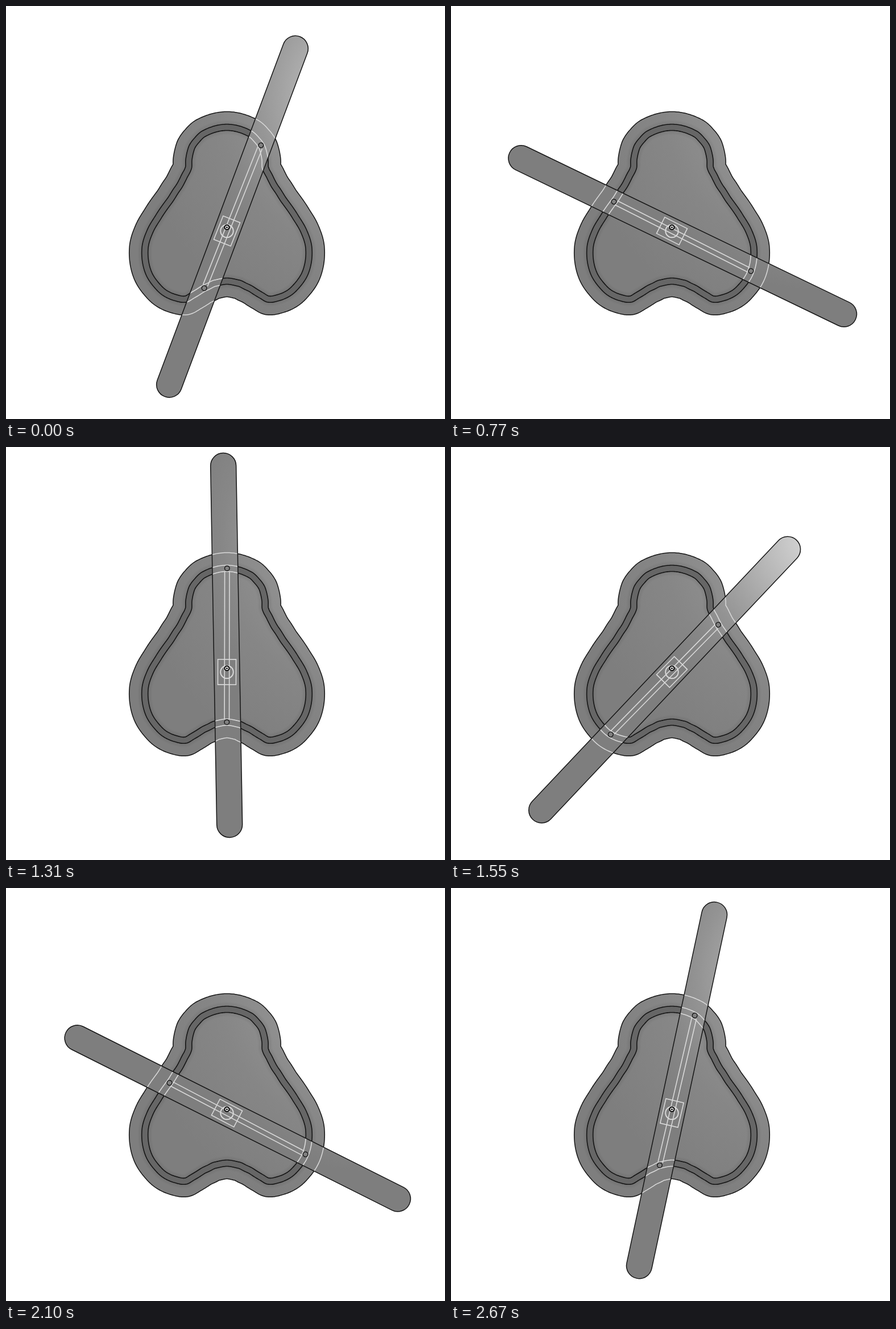
An HTML page with a canvas that plays this animation: 772 by 725 pixels, repeating every 2.74 s.

```html
<!DOCTYPE html>
<html lang="en">
<head>
<meta charset="utf-8">
<title>Constant-chord cam</title>
<style>
html, body { margin: 0; width: 772px; height: 725px; overflow: hidden; background: #fff; }
canvas { display: block; }
</style>
</head>
<body>
<canvas id="stage" width="772" height="725"></canvas>
<script>
const ctx = document.getElementById('stage').getContext('2d');
const LOOP = 2740, CX = 388.5, CY = 395, CHORD = 270;
const ARM = 180, HALF = 22.5, SKEW = 1.1;
const RAD = Math.PI / 180;
const INK = '#141414', HIDDEN = '#d9d9d9';

// Groove radius by angle from straight up; the rest follows from symmetry.
const knots = [
  [0, 182], [13.3, 175.7], [19, 167], [21.7, 162], [23.3, 158], [28.2, 141.8],
  [31.2, 130.3], [37.5, 122.3], [44.5, 116.3], [50.3, 114.3], [62.3, 114],
  [78.3, 123], [90, 135]
];

// [step, start in ms, bar angle in degrees]
const keys = [
  [0, 0, 20.6], [1, 70, 30], [6, 460, 76.9], [7, 540, 85.5], [8, 610, 94.4],
  [13, 1000, 147.7], [14, 1080, 156.8], [20, 1550, 223.4], [21, 1640, 234.3],
  [27, 2100, 296.6], [28, 2180, 307.3], [31, 2420, 339.8], [34, 2670, 372.1],
  [35, 2740, 380.6]
];

function knotSlope(i) {
  if (i === 0) return 0;
  const a = knots[i - 1], b = knots[Math.min(i + 1, knots.length - 1)];
  return (b[1] - a[1]) / (b[0] - a[0]);
}

function radius(deg) {
  let a = Math.abs(deg) % 360;
  if (a > 180) a = 360 - a;
  if (a > 90) return CHORD - radius(180 - a);
  let i = 0;
  while (i < knots.length - 2 && a > knots[i + 1][0]) i++;
  const [x0, y0] = knots[i], [x1, y1] = knots[i + 1];
  const h = x1 - x0, t = (a - x0) / h, u = 1 - t;
  return y0 * (1 + 2 * t) * u * u + knotSlope(i) * h * t * u * u
       + y1 * t * t * (3 - 2 * t) - knotSlope(i + 1) * h * t * t * u;
}

function buildGroove() {
  const path = new Path2D();
  for (let a = 0; a < 360; a += 0.5) {
    const r = radius(a);
    path.lineTo(CX + r * Math.sin(a * RAD), CY - r * Math.cos(a * RAD));
  }
  path.closePath();
  return path;
}

function buildSteps() {
  const steps = [];
  for (let i = 0; i < keys.length - 1; i++) {
    const [k0, t0, a0] = keys[i], [k1, t1, a1] = keys[i + 1];
    for (let k = k0; k < k1; k++) {
      const f = (k - k0) / (k1 - k0);
      steps.push({ start: Math.round((t0 + (t1 - t0) * f) / 10) * 10, angle: a0 + (a1 - a0) * f });
    }
  }
  return steps;
}

// Light from the upper right, fixed to the stage.
function light(size, stops) {
  const g = ctx.createRadialGradient(650, 160, 0, 650, 160, size);
  for (const [at, v] of stops) g.addColorStop(at / size, `rgb(${v},${v},${v})`);
  return g;
}

const groove = buildGroove();
const steps = buildSteps();
const bodyFill = light(430, [[0, 175], [195, 143], [280, 134], [430, 126]]);
const barFill = light(340, [[0, 220], [56, 201], [165, 163], [217, 147], [270, 135], [340, 126]]);

function band(style, width) {
  ctx.strokeStyle = style;
  ctx.lineWidth = width;
  ctx.stroke(groove);
}

function disc(x, y, r, fill, stroke, width) {
  ctx.beginPath();
  ctx.arc(x, y, r, 0, 2 * Math.PI);
  if (fill) { ctx.fillStyle = fill; ctx.fill(); }
  if (stroke) { ctx.strokeStyle = stroke; ctx.lineWidth = width; ctx.stroke(); }
}

// Nested strokes leave thin outlines at each offset from the groove.
function drawCam(line, face, floor, shade) {
  band(line, 56.5);
  band(face, 53.5);
  ctx.fillStyle = face;
  ctx.fill(groove);
  if (shade) for (const w of [25, 21, 17]) band('rgba(0,0,0,.025)', w);
  band(line, 12.6);
  band(floor, 9.4);
}

function barPath(deg, top, bottom) {
  const path = new Path2D(), shape = new Path2D();
  shape.arc(0, -top, HALF, Math.PI, 0);
  shape.arc(0, bottom, HALF, 0, Math.PI);
  shape.closePath();
  path.addPath(shape, new DOMMatrix().translate(CX, CY).rotate(deg));
  return path;
}

function draw(angle) {
  const pinAngle = angle + SKEW;
  const top = radius(pinAngle), bottom = CHORD - top;
  const bar = barPath(angle, top + ARM, bottom + ARM);

  ctx.fillStyle = '#fff';
  ctx.fillRect(0, 0, 772, 725);
  ctx.lineJoin = 'round';
  drawCam(INK, bodyFill, '#666', true);

  ctx.save();
  ctx.clip(bar);
  ctx.fillStyle = barFill;
  ctx.fillRect(0, 0, 772, 725);
  drawCam(HIDDEN, barFill, barFill, false);
  ctx.restore();

  ctx.strokeStyle = INK;
  ctx.lineWidth = 1.5;
  ctx.stroke(bar);

  ctx.save();
  ctx.translate(CX, CY);
  ctx.rotate(pinAngle * RAD);
  ctx.strokeStyle = HIDDEN;
  ctx.lineWidth = 1.6;
  ctx.lineJoin = 'miter';
  ctx.strokeRect(-16, -22.2, 32, 44.4);
  ctx.beginPath();
  for (const x of [-4.2, 4.2]) {
    ctx.moveTo(x, 5 - top);
    ctx.lineTo(x, bottom - 5);
  }
  ctx.stroke();
  disc(0, -top, 4.3, '#808080', INK, 1.4);
  disc(0, bottom, 4.3, '#808080', INK, 1.4);
  ctx.restore();

  disc(CX, CY, 11.3, null, HIDDEN, 1.9);
  disc(CX, 388.5, 3.9, '#fff', '#000', 2);
  disc(CX, 388.5, 1.5, '#000');
}

function frame() {
  const t = performance.now() % LOOP;
  let i = steps.length - 1;
  while (i > 0 && steps[i].start > t) i--;
  draw(steps[i].angle);
  requestAnimationFrame(frame);
}
frame();
</script>
</body>
</html>
```
